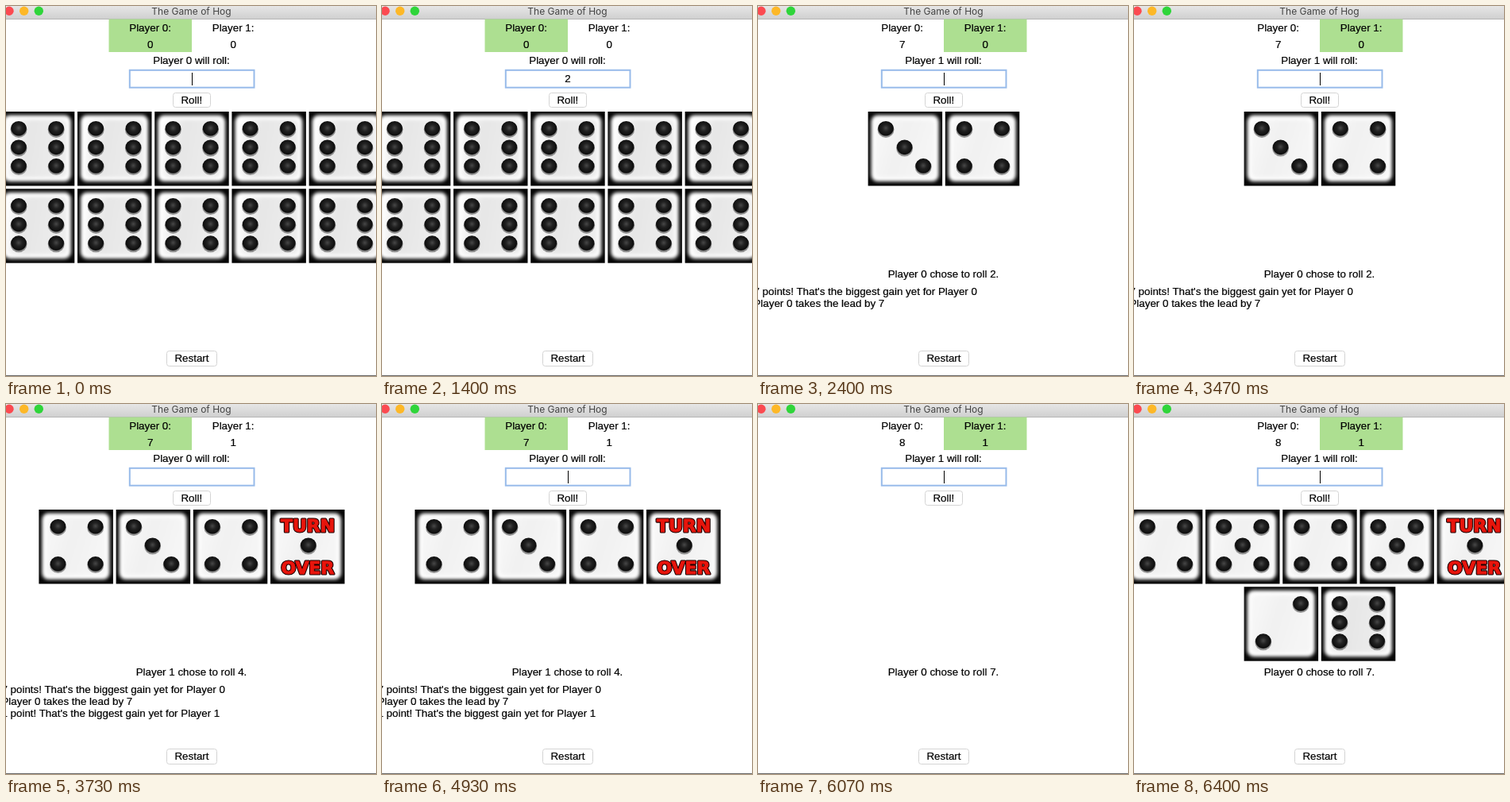
An HTML page for the animation above (8000 ms loop, 466x466 px).

```html
<!DOCTYPE html>
<html lang="en">
<head>
<meta charset="utf-8">
<title>The Game of Hog</title>
<style>
  html, body { margin: 0; height: 100%; overflow: hidden; background: #fff; }
  svg { display: block; width: 100%; height: 100%; }
  text { font: 13.36px "Liberation Sans", Arial, sans-serif; text-anchor: middle; stroke: #000; stroke-width: .2; }
  .title { font: 12px Inter, sans-serif; fill: #444; stroke: none; }
  .note { text-anchor: start; }
  .button { fill: #fff; stroke: #d4d4d4; }
  .over { font: bold 22px "DejaVu Sans", sans-serif; fill: #e8150c; stroke-linejoin: round; }
  .over .edge { stroke: #1a0000; stroke-width: 3.2; }
  .over .ink { stroke: #e8150c; stroke-width: 1; }
  .over text { font: inherit; }
</style>
</head>
<body>
<svg viewBox="0 0 466 466">
  <defs>
    <linearGradient id="bar" x2="0" y2="1">
      <stop stop-color="#e6e6e6"/><stop offset="1" stop-color="#d0d0d0"/>
    </linearGradient>
    <linearGradient id="gray" x2="1" y2=".15">
      <stop stop-color="#fff"/><stop offset=".1" stop-color="#f8f8f8"/>
      <stop offset=".4" stop-color="#e6e6e6"/><stop offset="1" stop-color="#ededed"/>
    </linearGradient>
    <linearGradient id="pale" x2="1" y2=".3">
      <stop stop-color="#f8f8f8"/><stop offset=".5" stop-color="#f1f1f1"/><stop offset="1" stop-color="#f5f5f5"/>
    </linearGradient>
    <radialGradient id="pip" cy=".42">
      <stop stop-color="#484848"/><stop offset=".4" stop-color="#222"/>
      <stop offset=".88" stop-color="#0d0d0d"/><stop offset="1" stop-color="#333" stop-opacity=".5"/>
    </radialGradient>
    <filter id="soft"><feGaussianBlur stdDeviation="2"/></filter>
  </defs>
  <rect width="466" height="466" fill="#fff"/>
  <rect width="466" height="16" fill="url(#bar)"/>
  <rect y="16" width="466" height="1" fill="#b5b5b5"/>
  <circle cx="4" cy="6.3" r="5.7" fill="#fb4a50"/>
  <circle cx="22.7" cy="6.3" r="5.7" fill="#fdb827"/>
  <circle cx="41.3" cy="6.3" r="5.7" fill="#2fd53a"/>
  <text class="title" x="233.5" y="11">The Game of Hog</text>
  <g id="game"></g>
  <rect class="button" x="210.5" y="109.5" width="47" height="18" rx="3"/>
  <text x="233.8" y="122.5">Roll!</text>
  <rect class="button" x="202.5" y="434.5" width="63" height="19" rx="3"/>
  <text x="234" y="448">Restart</text>
  <rect y="465" width="466" height="1" fill="#6a6a6a"/>
</svg>
<script>
const LOOP = 8000;
const firstNotes = ["7 points! That's the biggest gain yet for Player 0", "Player 0 takes the lead by 7"];
const secondNotes = [...firstNotes, "1 point! That's the biggest gain yet for Player 1"];

// Each entry changes part of the game state at its time in ms.
const timeline = [
  [0, { turn: 0, scores: [0, 0], entry: "", caret: true, dice: Array(10).fill(6), message: "", notes: [] }],
  [530, { caret: false }],
  [800, { caret: true }],
  [1400, { entry: "2", caret: false }],
  [1670, { turn: 1, scores: [7, 0], entry: "", caret: true, dice: [], message: "Player 0 chose to roll 2." }],
  [1730, { dice: [3, 4], notes: firstNotes }],
  [3670, { turn: 0, scores: [7, 1], caret: false, dice: [], message: "Player 1 chose to roll 4.", notes: [] }],
  [3730, { dice: [4, 3, 4, 1], notes: secondNotes }],
  [4070, { caret: true }],
  [4670, { caret: false }],
  [4930, { caret: true }],
  [5530, { caret: false }],
  [5730, { entry: "7" }],
  [5870, { caret: true }],
  [6070, { turn: 1, scores: [8, 1], entry: "", dice: [], message: "Player 0 chose to roll 7.", notes: [] }],
  [6130, { dice: [4, 5, 4, 5, 1, 2, 6] }],
];

const LOW = -23.6, HIGH = 23.6;
const corners = [[LOW, LOW], [HIGH, LOW], [LOW, HIGH], [HIGH, HIGH]];
// Pips are placed around the middle pip, whose x differs slightly per face.
const faces = {
  1: { middle: 47.8, pips: [[0, 0]] },
  2: { middle: 47.8, pips: [[HIGH, LOW], [LOW, HIGH]] },
  3: { middle: 46, pips: [[LOW, LOW], [0, 0], [HIGH, HIGH]] },
  4: { middle: 47.7, pips: corners },
  5: { middle: 46.8, pips: [...corners, [0, 0]] },
  6: { middle: 46.8, pips: [...corners, [LOW, 0], [HIGH, 0]] },
};

const label = (x, y, text, type = "") => `<text class="${type}" x="${x}" y="${y}">${text}</text>`;

const turnOver = `<g class="over">${["edge", "ink"].map(type =>
  label(47, 27.6, "TURN", type) + label(47, 81, "OVER", type)).join("")}</g>`;

function die(value, x, y) {
  const { middle, pips } = faces[value];
  const dots = pips.map(([dx, dy]) =>
    `<circle cx="${middle + dx}" cy="${46 + dy}" r="10.5" fill="url(#pip)"/>`).join("");
  return `<g transform="translate(${x} ${y})">
    <rect width="93.5" height="93.5" fill="#050505"/>
    <rect x="4" y="4.5" width="85" height="83.5" rx="8" fill="#fff" filter="url(#soft)"/>
    <rect x="9" y="10" width="75" height="73" rx="6" fill="url(#${value === 6 ? "gray" : "pale"})" filter="url(#soft)"/>
    ${dots}${value === 1 ? turnOver : ""}</g>`;
}

function diceRow(values, y) {
  return values.map((value, i) => die(value, 235.8 + (i - values.length / 2) * 97.2, y)).join("");
}

function draw({ turn, scores, entry, caret, dice, message, notes }) {
  const players = scores.map((score, i) => {
    const x = 181.6 + i * 104.5;
    return label(x, 32, `Player ${i}:`) + label(x, 52.5, score);
  }).join("");
  return `<rect x="${129.5 + turn * 104.5}" y="16.5" width="104.5" height="41.5" fill="#addf91"/>
    ${players}
    ${label(233.5, 73, `Player ${turn} will roll:`)}
    <rect x="155.8" y="80.8" width="156.7" height="21.9" fill="#fff" stroke="#98bbea" stroke-width="2"/>
    ${label(234, 96.3, entry)}
    ${caret ? `<rect x="${entry ? 237.6 : 234}" y="84" width="1" height="16"/>` : ""}
    ${diceRow(dice.slice(0, 5), 133)}${diceRow(dice.slice(5), 230.2)}
    ${label(233.5, 342.1, message)}
    ${notes.map((note, i) => label(-5.6, 363.7 + i * 15, note, "note")).join("")}`;
}

const game = document.getElementById("game");
let state = {};
const scenes = timeline.map(([time, change]) => {
  state = { ...state, ...change };
  return { time, markup: draw(state) };
});

let shown;
function tick() {
  const now = performance.now() % LOOP;
  const scene = scenes.findLast(({ time }) => time <= now);
  if (scene !== shown) {
    game.innerHTML = scene.markup;
    shown = scene;
  }
  requestAnimationFrame(tick);
}
tick();
</script>
</body>
</html>
```
